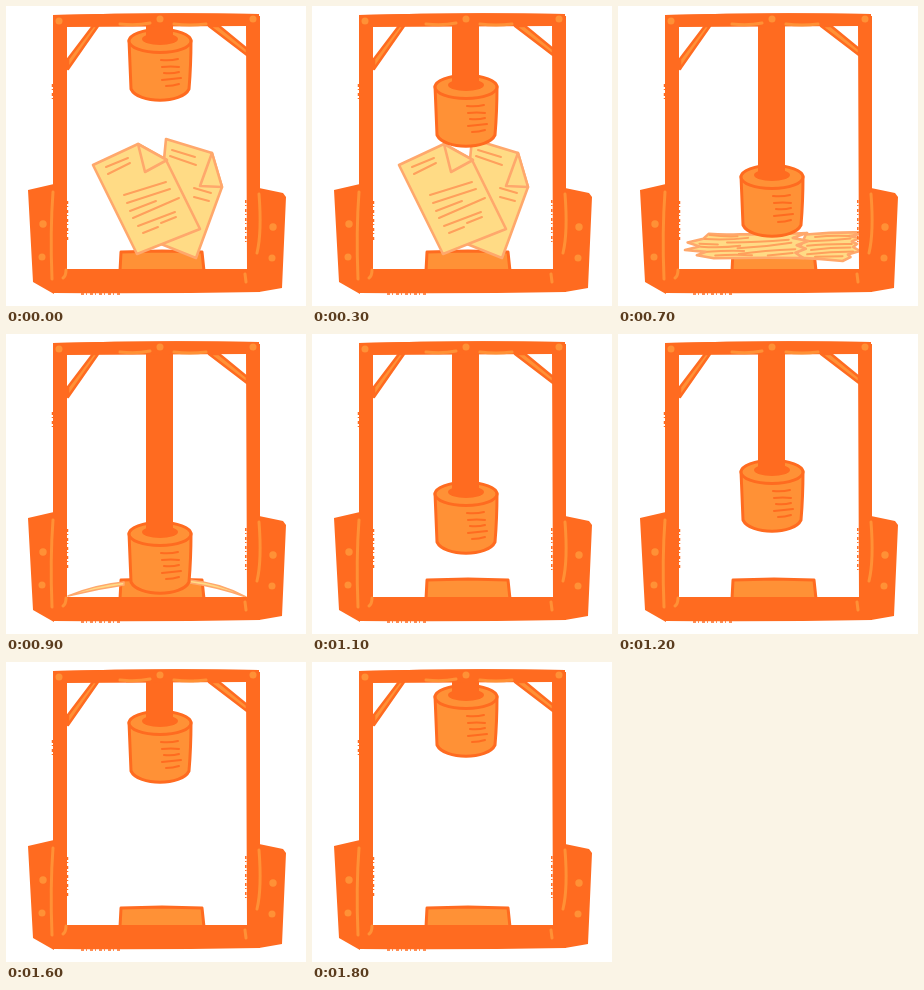
Write an HTML page that moves like this. It is 300 by 300 pixels and loops after 1.9 s.

```html
<!DOCTYPE html>
<html>
<head>
<meta charset="utf-8">
<title>Paper press</title>
<style>
  html, body { margin: 0; width: 100%; height: 100%; overflow: hidden; background: #fff; }
  svg { display: block; width: 100vw; height: 100vh; }
  path, ellipse { stroke-linecap: round; stroke-linejoin: round; }
  .dark { fill: #ff6b20; }
  .mid { fill: #ff9136; }
  .edge { stroke: #ff6b20; stroke-width: 3; }
  .line { fill: none; stroke: #ff6b20; stroke-width: 2; }
  .shine { fill: none; stroke: #ff9136; stroke-width: 3; }
  .rough { fill: none; stroke: #ff6b20; stroke-width: 1.5; stroke-dasharray: 3 2 1 3; stroke-linecap: butt; }
  .paper { fill: #ffdb85; stroke: #ffa86c; stroke-width: 2.6; }
  .ink { fill: none; stroke: #ffa05c; stroke-width: 2; }
  .crumple path { vector-effect: non-scaling-stroke; }
</style>
</head>
<body>
<svg viewBox="0 0 300 300">
  <!-- anvil -->
  <path class="mid edge" d="M115 246 156 245 196 246 198 265H114Z"/>

  <g id="slivers" class="paper" stroke-width="1.5">
    <path style="stroke-width:1.5" d="M62 262Q88 251 118 248L118 251Q90 255 62 262Z"/>
    <path style="stroke-width:1.5" d="M184 246Q215 249 240 263Q212 253 184 249Z"/>
  </g>

  <g id="sheets">
    <path class="paper" d="M160 133 206 147 216 181 190 252 150 236Z"/>
    <path class="paper" d="M206 147 194 180 216 181Z"/>
    <path class="ink" d="M166 144 189 151M164 150 190 159M188 182 205 187M188 191 203 195"/>
    <path class="paper" d="M87 159 132 138 160 154 194 223 131 248Z"/>
    <path class="paper" d="M132 138 139 166 161 154Z"/>
    <path class="ink" d="M100 161 122 152M102 168 124 157M118 189 160 176M121 197 164 183M124 205 150 195M127 212 173 192M132 220 169 206M137 227 152 221M155 217 170 211"/>
  </g>

  <g id="crumple" class="crumple">
    <path class="paper" d="M180 168Q200 160 221 161 224 165 213 173L221 180 215 191 219 199 216 209 221 222 212 234 214 242 208 255 190 248 172 244Z"/>
    <path class="paper" d="M106 166Q118 170 130 167 156 169 181 163L170 179 182 189 173 203 180 215 172 228 178 245Q140 243 110 246L97 236 104 225 88 219 99 207 90 194 102 182Z"/>
    <path class="ink" d="M107 170Q118 176 128 174M103 183Q120 187 136 179M120 194Q139 195 167 185M99 198 113 201M100 208Q115 213 130 205M128 213Q149 209 169 195M105 225Q121 219 133 222M129 232Q148 220 172 216M111 237Q125 232 139 236M151 237 170 229M187 176Q201 170 213 173M183 190Q199 188 214 181M181 205Q195 198 215 199M184 219Q199 211 214 211M181 233Q199 225 216 224M187 241 208 239"/>
  </g>

  <!-- piston -->
  <path id="rod" class="dark"/>
  <g id="hammer">
    <path class="mid edge" d="M123 34Q124 61 125 83C132 98 176 98 183 83Q185 60 185 34Z"/>
    <ellipse class="mid edge" cx="154" cy="35" rx="31" ry="11.5"/>
    <ellipse class="dark" cx="154" cy="33" rx="18" ry="6"/>
    <path class="dark" d="M140 10H167V34H140Z"/>
    <path class="line" d="M155 54Q164 55 172 53M156 61Q165 60 173 61M158 67Q166 68 173 66M156 74Q166 73 175 72M160 80Q167 80 173 78"/>
  </g>

  <!-- frame -->
  <path class="dark" fill-rule="evenodd" d="M47 9Q150 6 253 8L254 286Q150 288 48 287ZM61 21V263H241L240 20Z"/>
  <path class="dark" d="M22 184 48 178V288L27 276ZM253 182 277 187 280 191 276 282 253 286Z"/>
  <path class="mid edge" d="M92 20 62 63V53L87 20ZM203 20 241 49V43L213 20Z" style="stroke-width:2.5"/>
  <path class="dark" d="M47 9Q150 6 253 8V20H47ZM47 10H61V286H47ZM241 10H254V286H241Z"/>
  <path class="rough" d="M46.5 78V96M61.5 195V236M239.8 194V236M75 288H115M47 196V208"/>
  <path class="shine" d="M47 186Q44 225 46 273M253 188Q256 226 251 247M57 272Q60 270 60 264M239 268 240 276M114 18Q130 20 144 17M168 18Q184 20 200 18"/>
  <g class="mid">
    <circle cx="53" cy="15" r="3.5"/>
    <circle cx="154" cy="13" r="3.5"/>
    <circle cx="247" cy="13" r="3.5"/>
    <circle cx="37" cy="218" r="3.7"/>
    <circle cx="36" cy="251" r="3.5"/>
    <circle cx="267" cy="221" r="3.7"/>
    <circle cx="266" cy="252" r="3.5"/>
  </g>
</svg>
<script>
  const LOOP = 1900, STEP = 100;
  // Hammer travel and crumpled-paper half width, one value per step
  const drop = [0, 15, 31, 46, 59, 72, 104, 136, 160, 165, 146, 125, 103, 82, 60, 42, 26, 11, 0];
  const spread = { 4: 66, 5: 67, 6: 78, 7: 88 };
  const [rod, hammer, sheets, crumple, slivers] =
    ['rod', 'hammer', 'sheets', 'crumple', 'slivers'].map(id => document.getElementById(id));
  const show = (el, on) => el.setAttribute('visibility', on ? 'visible' : 'hidden');

  function draw(now) {
    const step = Math.floor(now % LOOP / STEP);
    const y = drop[step], width = spread[step];
    rod.setAttribute('d', `M140 12H167V${34 + y}H140Z`);
    hammer.setAttribute('transform', `translate(0 ${y})`);
    // The shaft inside the hammer group stays hidden behind the rod's own colour
    show(sheets, step < 4);
    show(crumple, width);
    show(slivers, step > 7 && step < 11);
    if (width) {
      const sx = width / 67, sy = (255 - 91 - y) / 92;
      crumple.setAttribute('transform', `translate(${155 - 155 * sx} ${255 - 255 * sy}) scale(${sx} ${sy})`);
    }
    requestAnimationFrame(draw);
  }
  draw(0);
</script>
</body>
</html>
```
